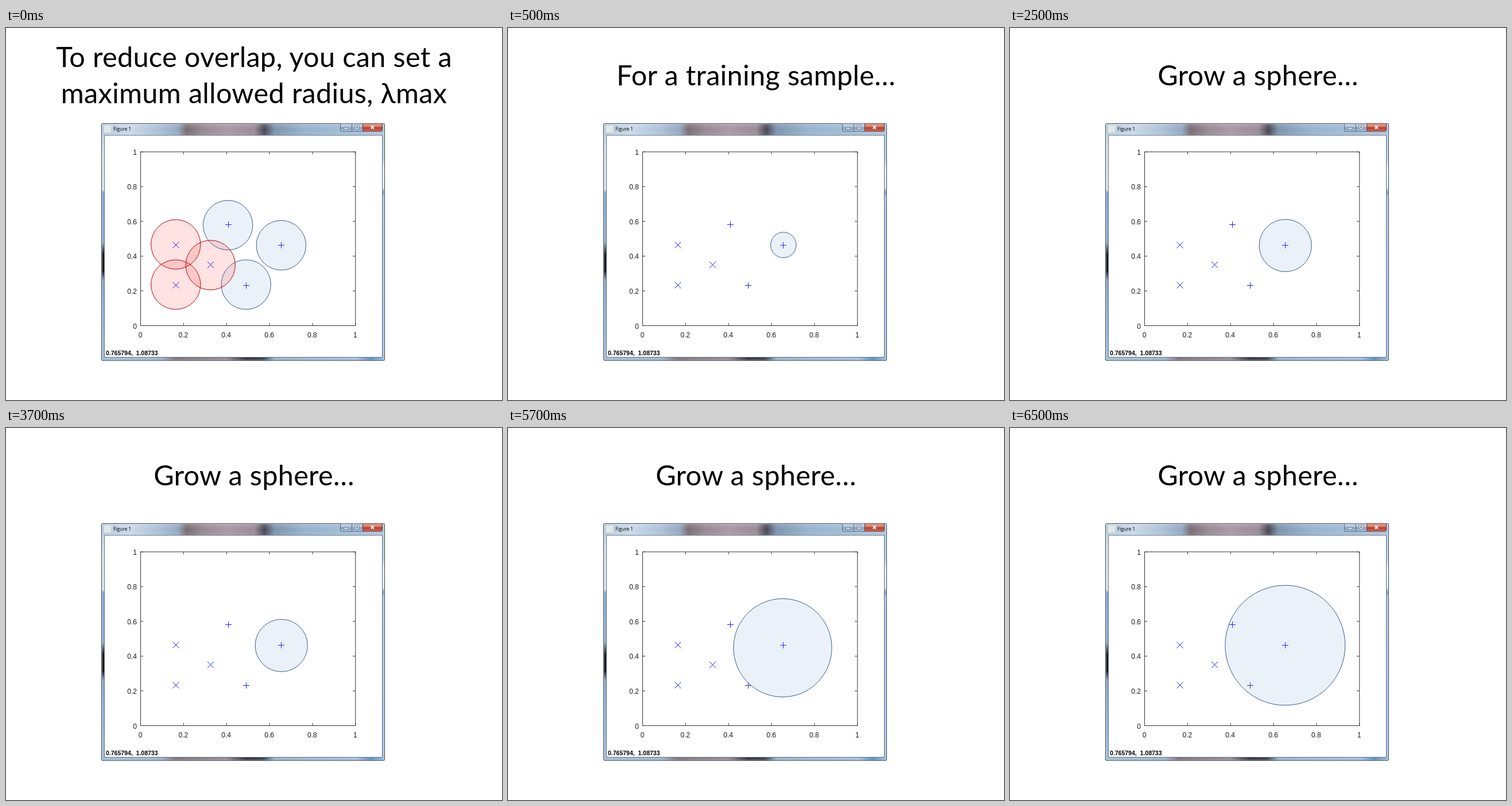
These frames come from a looping animation (864x648 px, 8 s). An HTML page:

```html
<!DOCTYPE html>
<html lang="en">
<head>
<meta charset="utf-8">
<title>Growing a sphere</title>
<style>
  html, body { margin: 0; width: 100%; height: 100%; overflow: hidden; background: #fff; }
  svg { display: block; width: 864px; height: 648px; }

  .title text {
    font: 48.6px Lato, "Open Sans", sans-serif;
    letter-spacing: .3px; word-spacing: .2px; text-anchor: middle;
  }
  .caption { font: 8.4px "Open Sans", sans-serif; }
  .status { font: bold 10.5px "Liberation Sans", Arial, sans-serif; white-space: pre; }
  .labels { font: 12px "Liberation Sans", Arial, sans-serif; fill: #1a1a1a; }
  .axes { fill: none; stroke: #333; stroke-width: 1; }
  .marks { fill: none; stroke: #2020ff; stroke-width: 1; }
  .blue { fill: rgba(79, 129, 189, .11); stroke: #385d8a; }
  .red { fill: rgba(255, 0, 0, .115); stroke: #c00000; }

  .step { animation: 8s step-end infinite; }
  .overlap { animation-name: overlap; }
  .sample { animation-name: sample; }
  .grow { animation-name: grow; }
  .sphere { animation-name: sphere; }

  @keyframes overlap {
    0% { visibility: visible; }
    6.25%, 100% { visibility: hidden; }
  }
  @keyframes sample {
    0% { visibility: hidden; }
    6.25% { visibility: visible; }
    31.25%, 100% { visibility: hidden; }
  }
  @keyframes grow {
    0% { visibility: hidden; }
    31.25%, 100% { visibility: visible; }
  }
  @keyframes sphere {
    0% { visibility: hidden; cx: 479.8px; cy: 378px; r: 22.2px; }
    6.25% { visibility: visible; cx: 479.8px; cy: 378px; r: 22.2px; }
    31.25% { visibility: visible; cx: 479.7px; cy: 378.9px; r: 45.6px; }
    56.25% { visibility: visible; cx: 478.4px; cy: 382.9px; r: 85.6px; }
    81.25%, 100% { visibility: visible; cx: 479.3px; cy: 378.5px; r: 104.5px; }
  }
</style>
</head>
<body>
<svg viewBox="0 0 864 648">
  <defs>
    <linearGradient id="bar">
      <stop offset="0" stop-color="#b4cade"/>
      <stop offset=".1" stop-color="#c6d8e8"/>
      <stop offset=".2" stop-color="#aac0d6"/>
      <stop offset=".27" stop-color="#8fa6bf"/>
      <stop offset=".3" stop-color="#75676e"/>
      <stop offset=".36" stop-color="#94858f"/>
      <stop offset=".44" stop-color="#a595a1"/>
      <stop offset=".54" stop-color="#978893"/>
      <stop offset=".575" stop-color="#42414d"/>
      <stop offset=".61" stop-color="#7890ab"/>
      <stop offset=".72" stop-color="#94b0cc"/>
      <stop offset="1" stop-color="#a9c5e0"/>
    </linearGradient>
    <linearGradient id="gloss" x2="0" y2="1">
      <stop offset="0" stop-color="#fff" stop-opacity=".2"/>
      <stop offset=".5" stop-color="#fff" stop-opacity=".03"/>
      <stop offset="1" stop-color="#fff" stop-opacity=".12"/>
    </linearGradient>
    <linearGradient id="left" x2="0" y2="1">
      <stop offset="0" stop-color="#b5cbe0"/>
      <stop offset=".1" stop-color="#d3e1ee"/>
      <stop offset=".28" stop-color="#dde8f2"/>
      <stop offset=".29" stop-color="#86a9ce"/>
      <stop offset=".5" stop-color="#8fb0d2"/>
      <stop offset=".55" stop-color="#1b1c22"/>
      <stop offset=".62" stop-color="#17181d"/>
      <stop offset=".66" stop-color="#88a8c9"/>
      <stop offset="1" stop-color="#a5c1de"/>
    </linearGradient>
    <linearGradient id="right" x2="0" y2="1">
      <stop offset="0" stop-color="#a9c5e0"/>
      <stop offset=".15" stop-color="#b5cde4"/>
      <stop offset=".19" stop-color="#e3ecf4"/>
      <stop offset=".27" stop-color="#dfe9f2"/>
      <stop offset=".29" stop-color="#7893b0"/>
      <stop offset=".31" stop-color="#a9c4df"/>
      <stop offset="1" stop-color="#a3c2e2"/>
    </linearGradient>
    <linearGradient id="foot">
      <stop offset="0" stop-color="#a5c1de"/>
      <stop offset=".21" stop-color="#9fb6cf"/>
      <stop offset=".26" stop-color="#85727b"/>
      <stop offset=".44" stop-color="#a28e98"/>
      <stop offset=".51" stop-color="#35343d"/>
      <stop offset=".57" stop-color="#3d424e"/>
      <stop offset=".61" stop-color="#9ab5d1"/>
      <stop offset=".9" stop-color="#a6c4e2"/>
      <stop offset=".95" stop-color="#5f8fc0"/>
      <stop offset="1" stop-color="#a6c4e2"/>
    </linearGradient>
    <linearGradient id="button" x2="0" y2="1">
      <stop offset="0" stop-color="#c9d7e6"/>
      <stop offset=".48" stop-color="#aabfd5"/>
      <stop offset=".5" stop-color="#849fbd"/>
      <stop offset="1" stop-color="#adc6df"/>
    </linearGradient>
    <linearGradient id="close" x2="0" y2="1">
      <stop offset="0" stop-color="#e4aa9e"/>
      <stop offset=".48" stop-color="#cd6b59"/>
      <stop offset=".5" stop-color="#b83922"/>
      <stop offset="1" stop-color="#d0705a"/>
    </linearGradient>
    <clipPath id="shape"><rect x="166" y="166" width="494" height="413.5" rx="2"/></clipPath>
  </defs>

  <g class="title">
    <g class="step overlap">
      <text x="432" y="67.5">To reduce overlap, you can set a</text>
      <text x="432" y="130.5">maximum allowed radius, λmax</text>
    </g>
    <text class="step sample" x="432" y="99.5">For a training sample…</text>
    <text class="step grow" x="432" y="99.5">Grow a sphere…</text>
  </g>

  <g clip-path="url(#shape)">
    <rect x="166" y="166" width="6" height="414" fill="url(#left)"/>
    <rect x="655" y="166" width="5" height="414" fill="url(#right)"/>
    <rect x="166" y="573" width="494" height="7" fill="url(#foot)"/>
    <rect x="166" y="166" width="494" height="21" fill="url(#bar)"/>
    <rect x="166" y="166" width="494" height="21" fill="url(#gloss)"/>
  </g>
  <rect x="167.5" y="167.5" width="491" height="410.5" rx="2" fill="none" stroke="#fff" stroke-opacity=".4"/>
  <rect x="166.5" y="166.5" width="493" height="412.5" rx="2" fill="none" stroke="#3d4650"/>
  <rect x="171.5" y="187" width="484" height="386.5" fill="#fff" stroke="#67788a"/>
  <rect x="171" y="170" width="12" height="12" fill="#e2e8e4"/>
  <text class="caption" x="187" y="179.3">Figure 1</text>

  <g stroke="#566577">
    <path d="M582.5 166.5h20v13.5h-18q-2 0-2-2z" fill="url(#button)"/>
    <path d="M602.5 166.5h19v13.5h-19z" fill="url(#button)"/>
    <path d="M621.5 166.5h34v11.5q0 2-2 2h-32z" fill="url(#close)" stroke="#6b3a35"/>
  </g>
  <g fill="#fff" stroke="#4d5866" stroke-width=".7">
    <rect x="588.5" y="173.5" width="8" height="2.5"/>
    <path d="M608 169.5h7v6.5h-7zM610 171.7v2.2h3v-2.2z" fill-rule="evenodd"/>
  </g>
  <path d="M635.8 170.5l5 5m0-5l-5 5" stroke="#fff" stroke-width="1.8"/>

  <g class="axes" id="axes"><rect x="234.5" y="215.75" width="374.25" height="302.75"/></g>
  <g class="labels" id="labels"></g>
  <text class="status" x="174" y="569.7">0.765794,  1.08733</text>

  <g class="marks">
    <path id="plus"/>
    <path id="cross"/>
  </g>

  <circle class="step sphere blue"/>
  <g class="step overlap" id="spheres"></g>
</svg>
<script>
  const $ = id => document.getElementById(id);

  function add(parent, tag, attrs, text = "") {
    const el = document.createElementNS("http://www.w3.org/2000/svg", tag);
    for (const name in attrs) el.setAttribute(name, attrs[name]);
    el.textContent = text;
    $(parent).append(el);
  }

  // Axis ticks and labels
  for (let i = 0; i <= 5; i++) {
    const x = 234.5 + i * 74.85;
    const y = 518.5 - i * 60.55;
    const label = String(i / 5);
    add("axes", "path", { d: `M${x} 518v-4M${x} 216v4M235 ${y}h4M608 ${y}h-4` });
    add("labels", "text", { x: x - .5, y: 539, "text-anchor": "middle" }, label);
    add("labels", "text", { x: 228, y: y + 5, "text-anchor": "end" }, label);
  }

  // Sample points
  const plus = [[387.5, 342.5], [479.5, 378.5], [418.5, 448.5]];
  const cross = [[296, 378], [356.5, 412.5], [296, 448]];
  $("plus").setAttribute("d", plus.map(([x, y]) => `M${x - 5.5} ${y}h11M${x} ${y - 5.5}v11`).join(""));
  $("cross").setAttribute("d", cross.map(([x, y]) => `M${x - 5.5} ${y - 5.5}l11 11m0-11l-11 11`).join(""));

  // Spheres limited to the maximum radius
  const limited = (type, centres) => centres.forEach(([cx, cy]) =>
    add("spheres", "circle", { class: type, cx, cy, r: 43.2 }));
  limited("blue", [[386.6, 343.5], [479.3, 378.5], [418.2, 447]]);
  limited("red", [[295.7, 377], [295.7, 447], [356.2, 413]]);
</script>
</body>
</html>
```
